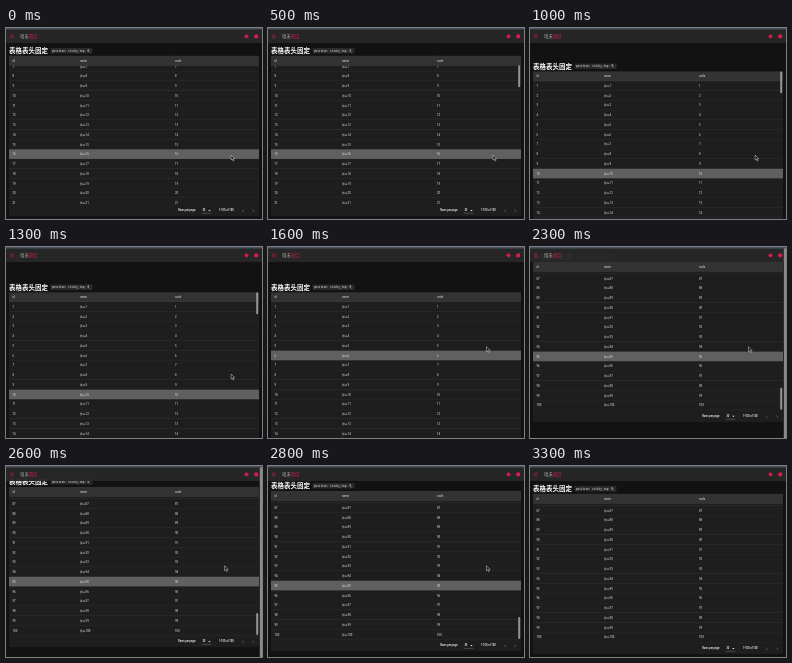
Animation, 256 px wide and 191 px high, one loop 4.4 s. Source, as an HTML page:

```html
<!DOCTYPE html>
<html lang="zh">
<head>
<meta charset="utf-8">
<title>表格表头固定</title>
<style>
html, body { margin: 0; width: 100%; height: 100%; overflow: hidden; background: #121212; }
svg { display: block; }
#stage { width: 100vw; height: 100vh; }
text { font-family: Roboto, "Noto Sans CJK SC", "Noto Sans CJK", sans-serif; font-size: 2.8px; fill: #eee; }
.title { font-size: 6.5px; font-weight: 700; fill: #fff; }
.tag { font-family: "Noto Sans Mono", "DejaVu Sans Mono", monospace; font-size: 2.7px; }
.small { font-size: 2.6px; font-weight: 500; fill: #fff; }
.brand { font-size: 4.2px; fill: #a8a8a8; }
.pink { fill: #d81b50; }
.chevron { fill: none; stroke: #888; stroke-width: .5; }
</style>
</head>
<body>
<svg id="stage" viewBox="0 0 256 191" preserveAspectRatio="none">
  <rect width="256" height="191" fill="#121212"/>
  <g id="page">
    <text class="title" x="3" y="25">表格表头固定</text>
    <rect x="44.5" y="20" width="42" height="5.4" rx=".8" fill="#292929"/>
    <text class="tag" x="46" y="23.6">position: sticky;top: 0;</text>
    <rect x="3" y="27.8" width="250" height="160.2" rx=".8" fill="#1e1e1e"/>
    <svg x="3" y="27.8" width="250" height="148.5" viewBox="3 27.8 250 148.5">
      <g id="rows"></g>
      <g id="head"></g>
      <rect id="thumb" x="250.2" width="2" height="22" rx="1" fill="#949494"/>
    </svg>
    <g id="footer">
      <text class="small" x="172.2" y="183.3">Rows per page:</text>
      <text class="small" x="196.4" y="183.3">30</text>
      <path d="M202.2 181.9h2.4l-1.2 1.3z" fill="#eee"/>
      <path d="M195.8 185.3h9.4" stroke="#888" stroke-width=".4"/>
      <text class="small" x="212.8" y="183.3">1-100 of 100</text>
      <path class="chevron" d="M237.6 181.6l-1.2 1.2 1.2 1.2M246.6 181.6l1.2 1.2-1.2 1.2"/>
    </g>
  </g>
  <rect y="1" width="256" height="14" fill="#272727" fill-opacity=".96"/>
  <rect id="pageBar" x="253.8" y="1" width="2.2" height="190" fill="#8a8a8a"/>
  <rect width="256" height="1.5" fill="#465261"/>
  <path d="M4 7h3.6M4 8.4h3.6M4 9.8h3.6" stroke="#b51a48" stroke-width=".6"/>
  <text class="brand" x="14.3" y="9.9">晴禾<tspan class="pink">项目</tspan></text>
  <path class="pink" d="M240.5 6l2.3 2.4-2.3 2.4-2.3-2.4z"/>
  <circle class="pink" cx="250.2" cy="8.4" r="2.1"/>
  <path id="cursor" d="M0 0v5l1.2-1 .9 2 .8-.4-.9-1.9h1.6z" fill="#111" stroke="#eee" stroke-width=".45"/>
</svg>
<script>
const LOOP = 4400, STEP = 100, PITCH = 9.75, TOP = 27.8, VIEW = 148.5;
const CONTENT = PITCH * 101, END = CONTENT - VIEW;
const PAPER = "#1e1e1e";
const $ = id => document.getElementById(id);

function add(parent, tag, attrs, text) {
  const el = document.createElementNS("http://www.w3.org/2000/svg", tag);
  for (const key in attrs) el.setAttribute(key, attrs[key]);
  if (text !== undefined) el.textContent = text;
  parent.append(el);
  return el;
}

function addRow(parent, n, cells, fill) {
  const y = TOP + n * PITCH;
  const back = add(parent, "rect", { x: 3, y, width: 250, height: PITCH, fill });
  add(parent, "rect", { x: 3, y: y + PITCH - .3, width: 250, height: .3, fill: "#454545" });
  [6.5, 74, 169].forEach((x, i) => add(parent, "text", { x, y: y + 5.9 }, cells[i]));
  return back;
}

addRow($("head"), 0, ["id", "name", "code"], "#333");
const backs = [null];
for (let n = 1; n <= 100; n++) backs.push(addRow($("rows"), n, [n, "张三" + n, n], PAPER));

const smooth = k => k * k * (3 - 2 * k);
const easeOut = k => 1 - (1 - k) ** 2;
const ramp = (t, from, to, ease = smooth) =>
  ease(Math.min(1, Math.max(0, (t - from) / (to - from))));
const within = (t, from, to) => t >= from && t < to;

// The page is pulled past its top, then past its bottom, and springs back.
const pageShift = t =>
  17.5 * (ramp(t, 800, 1100, easeOut) - ramp(t, 1600, 1800)) -
  16 * (ramp(t, 1800, 2000) - ramp(t, 2000, 3100));
const tableScroll = t =>
  62.4 * (1 - ramp(t, 500, 900)) + END * ramp(t, 1700, 1900);

// The hovered row lags behind while scrolling.
function hoverRow(t) {
  if (t < 900) return 16 - Math.round(6 * ramp(t, 500, 900));
  if (t < 1500) return 10;
  return t < 1800 ? 6 : 95;
}

function show(id, on) {
  $(id).setAttribute("opacity", on ? 1 : 0);
}

function move(id, x, y) {
  $(id).setAttribute("transform", `translate(${x} ${y})`);
}

let lit = backs[1];
function draw(t) {
  const scroll = tableScroll(t);
  move("page", 0, pageShift(t));
  move("rows", 0, -scroll);
  $("thumb").setAttribute("y", TOP + scroll / CONTENT * VIEW);
  show("thumb", within(t, 500, 1400) || within(t, 1700, 3100));
  show("pageBar", within(t, 1800, 2700));

  lit.setAttribute("fill", PAPER);
  lit = backs[hoverRow(t)];
  if (t < 3300) lit.setAttribute("fill", t < 3200 ? "#606060" : "#3f3f3f");

  const k = ramp(t, 1300, 1600);
  move("cursor", 225.1 - 6.6 * k, 127 - 27.3 * k);
  show("cursor", t < 3200);
}

const start = performance.now();
function tick() {
  const t = Math.max(0, performance.now() - start) % LOOP;
  draw(Math.floor(t / STEP) * STEP);
  requestAnimationFrame(tick);
}
tick();
</script>
</body>
</html>
```
